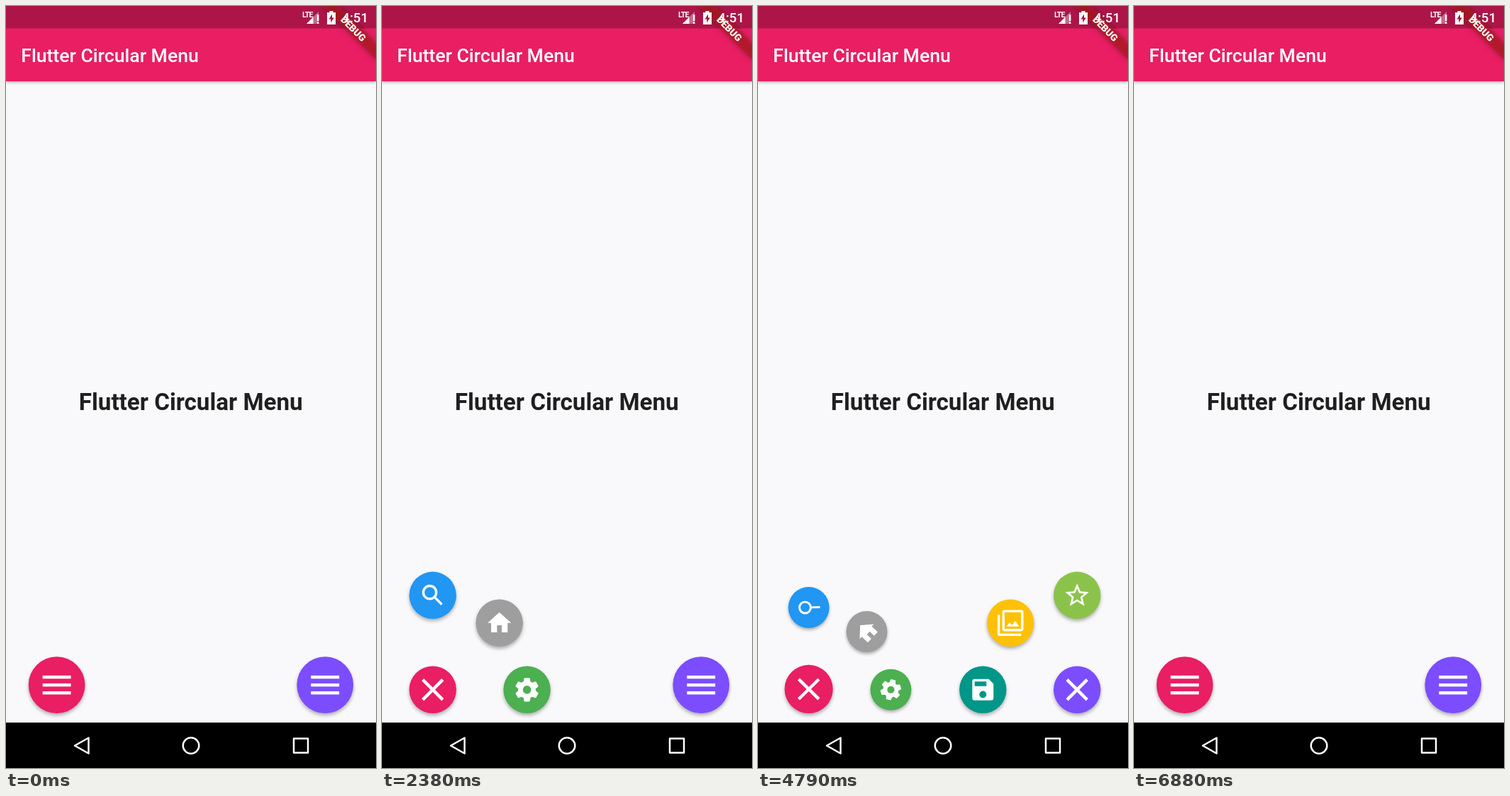
Write an HTML page that moves like this. It is 522 by 1073 pixels and loops after 7 s.

```html
<!DOCTYPE html>
<html lang="en">
<head>
<meta charset="utf-8">
<title>Flutter Circular Menu</title>
<style>
  html, body { margin: 0; width: 100%; height: 100%; overflow: hidden; background: #f9f9fb; }
  svg { display: block; width: 522px; height: 1073px; font-family: Roboto, sans-serif; }
  .raised { filter: drop-shadow(0 3px 2.5px rgba(0, 0, 0, .3)); }
  .bar { filter: drop-shadow(0 1.5px 2px rgba(0, 0, 0, .4)); }
  .ribbon { filter: drop-shadow(0 0 4px rgba(0, 0, 0, .5)); }
</style>
</head>
<body>
<svg id="stage" viewBox="0 0 522 1073" xmlns="http://www.w3.org/2000/svg">
  <rect width="522" height="1073" fill="#f9f9fb"/>
  <text x="260.7" y="569" font-size="33.2" font-weight="700" fill="#1f1f20" text-anchor="middle">Flutter Circular Menu</text>

  <rect class="bar" width="522" height="106" fill="#e91e63"/>
  <rect width="522" height="31.5" fill="#ad1548"/>
  <text x="21.3" y="79" font-size="26.6" font-weight="500" fill="#fff">Flutter Circular Menu</text>

  <g transform="translate(522 0) rotate(45)">
    <rect class="ribbon" x="-53.2" y="37.2" width="106.4" height="16" fill="#b71c1c" fill-opacity=".63"/>
    <text y="50" font-size="13.6" font-weight="900" fill="#fff" text-anchor="middle">DEBUG</text>
  </g>

  <g fill="#fff">
    <text x="418" y="16" font-size="10.5" font-weight="700" letter-spacing="-.8">LTE</text>
    <path d="M441 8V25H424Z" opacity=".35"/>
    <path d="M433.500 15.500V25H424Z"/>
    <path d="M438.800 12H441.400V21H438.800ZM438.800 22.600H441.400V25H438.800Z"/>
    <path fill-rule="evenodd" d="M456.500 7H461.500V9H465V26H453V9H456.500ZM460 11.500L455.500 18.500H458.300V23.500L462.700 16.500H460Z"/>
    <text x="511" y="23" font-size="18.6" font-weight="500" text-anchor="end">4:51</text>
  </g>

  <g id="menus"></g>

  <rect y="1009" width="522" height="64" fill="#000"/>
  <g fill="none" stroke="#fff" stroke-width="2.5" stroke-linejoin="round">
    <path d="M97 1041.500L116.500 1030.500V1052.500Z"/>
    <circle cx="261" cy="1041.500" r="11.300"/>
    <rect x="406" y="1031.500" width="20" height="20"/>
  </g>
</svg>
<script>
const LOOP = 7000, SPAN = 500;
const DP = 522 / 392.7;
const BASE = 996, RADIUS = 100 * DP, ITEM_R = 25 * DP;
const SVG = 'http://www.w3.org/2000/svg';

// Icons on a 24 x 24 grid
const tooth = a => `<path transform="translate(12 12) rotate(${a})" d="M-3-6.700L-2.450-9.600Q-2.400-10-2-10H2Q2.400-10 2.450-9.600L3-6.700Z"/>`;
const icons = {
  search: '<g fill="none" stroke="#fff" stroke-width="2.050"><circle cx="9.500" cy="9.500" r="5.500"/><path d="M13.500 13.500L19.740 19.740"/></g>',
  home: '<path d="M10 20v-6h4v6h5v-8h3L12 3 2 12h3v8z"/>',
  gear: '<circle cx="12" cy="12" r="5.500" fill="none" stroke="#fff" stroke-width="4"/>' +
    [0, 60, 120, 180, 240, 300].map(tooth).join(''),
  star: '<path fill-rule="evenodd" d="M22 9.240L14.810 8.620 12 2 9.190 8.630 2 9.240 7.460 13.970 5.820 21 12 17.270 18.180 21 16.550 13.970ZM12 15.400L8.240 17.670 9.240 13.390 5.920 10.510 10.300 10.130 12 6.100 13.710 10.140 18.090 10.520 14.770 13.400 15.770 17.680Z"/>',
  pages: '<g fill="none" stroke="#fff" stroke-width="2"><rect x="6" y="2" width="16" height="16" rx="1"/><path d="M2 5V21Q2 22 3 22H21"/></g>' +
    '<path d="M15.960 10.290L13.210 13.830 11.250 11.470 8.500 15H19.500Z"/>',
  save: '<path fill-rule="evenodd" d="M17 3H5A2 2 0 0 0 3 5V19A2 2 0 0 0 5 21H19A2 2 0 0 0 21 19V7ZM12 19A3 3 0 0 1 12 13A3 3 0 0 1 12 19ZM15 9H5V5H15Z"/>'
};

const menus = [
  { x: 71.6, color: '#e91e63', open: 1543, close: 4588, from: -90, step: 45,
    items: [['#2196f3', 'search'], ['#9e9e9e', 'home'], ['#4caf50', 'gear']] },
  { x: 450.2, color: '#7c4dff', open: 3003, close: 6090, from: -180, step: 45,
    items: [['#009688', 'save'], ['#ffc107', 'pages'], ['#8bc34a', 'star']] }
];

function add(parent, tag, attrs, html) {
  const el = document.createElementNS(SVG, tag);
  set(el, attrs);
  if (html) el.innerHTML = html;
  return parent.appendChild(el);
}

function set(el, attrs) {
  for (const k in attrs) el.setAttribute(k, attrs[k]);
}

const clamp = x => Math.max(0, Math.min(1, x));

function bounceOut(t) {
  const k = 7.5625, d = 2.75;
  if (t < 1 / d) return k * t * t;
  if (t < 2 / d) return k * (t -= 1.5 / d) * t + .75;
  if (t < 2.5 / d) return k * (t -= 2.25 / d) * t + .9375;
  return k * (t -= 2.625 / d) * t + .984375;
}

// Cubic bezier (.4, 0, .2, 1)
function fastOutSlowIn(x) {
  if (x <= 0 || x >= 1) return clamp(x);
  let lo = 0, hi = 1, s = .5;
  for (let i = 0; i < 24; i++) {
    s = (lo + hi) / 2;
    const r = 1 - s;
    if (1.2 * r * r * s + .6 * r * s * s + s * s * s < x) lo = s; else hi = s;
  }
  return s * s * (3 - 2 * s);
}

function build(menu) {
  const root = add(document.getElementById('menus'), 'g', {});
  menu.parts = menu.items.map(([color, icon], i) => {
    const g = add(root, 'g', { class: 'raised' });
    add(g, 'circle', { r: ITEM_R, fill: color });
    const spin = add(g, 'g', { fill: '#fff' });
    add(spin, 'g', { transform: `scale(${30 * DP / 24}) translate(-12 -12)` }, icons[icon]);
    return { g, spin, angle: (menu.from + menu.step * i) * Math.PI / 180 };
  });
  menu.button = add(root, 'g', {});
  menu.disc = add(menu.button, 'circle', { class: 'raised', fill: menu.color });
  menu.glow = add(menu.button, 'circle', { fill: '#c0c0c0' });
  const h = 4.43, w = 39.9;
  menu.bars = [-1, 0, 1].map(() =>
    add(menu.button, 'rect', { x: -w / 2, y: -h / 2, width: w, height: h, fill: '#fff' }));
}

// Press highlight: fades in before the tap, out after it
function press(t, tap) {
  const d = t - tap;
  return .3 * (d < 0 ? clamp((d + 240) / 200) : clamp(1 - d / 200));
}

function drawMenu(menu, t) {
  const v = t < menu.close
    ? bounceOut(clamp((t - menu.open) / SPAN))
    : fastOutSlowIn(1 - clamp((t - menu.close) / SPAN));

  for (const { g, spin, angle } of menu.parts) {
    const x = menu.x + Math.cos(angle) * v * RADIUS;
    const y = BASE - ITEM_R + Math.sin(angle) * v * RADIUS;
    set(g, { transform: `translate(${x} ${y}) scale(${v})`, visibility: v > .001 ? 'visible' : 'hidden' });
    set(spin, { transform: `rotate(${v * 360})` });
  }

  const r = (30 - 5 * v) * DP;
  set(menu.button, { transform: `translate(${menu.x} ${BASE - r})` });
  set(menu.disc, { r });
  set(menu.glow, { r, opacity: Math.max(press(t, menu.open), press(t, menu.close)) });

  const m = fastOutSlowIn(v), gap = 11.1 * (1 - m);
  set(menu.bars[0], { transform: `translate(0 ${-gap}) rotate(${45 * m})` });
  set(menu.bars[1], { opacity: clamp(1 - 2 * m) });
  set(menu.bars[2], { transform: `translate(0 ${gap}) rotate(${-45 * m})` });
}

function draw(t) {
  for (const menu of menus) drawMenu(menu, t);
}

menus.forEach(build);
draw(0);
const start = performance.now();
(function tick() {
  draw((performance.now() - start) % LOOP);
  requestAnimationFrame(tick);
})();
</script>
</body>
</html>
```
